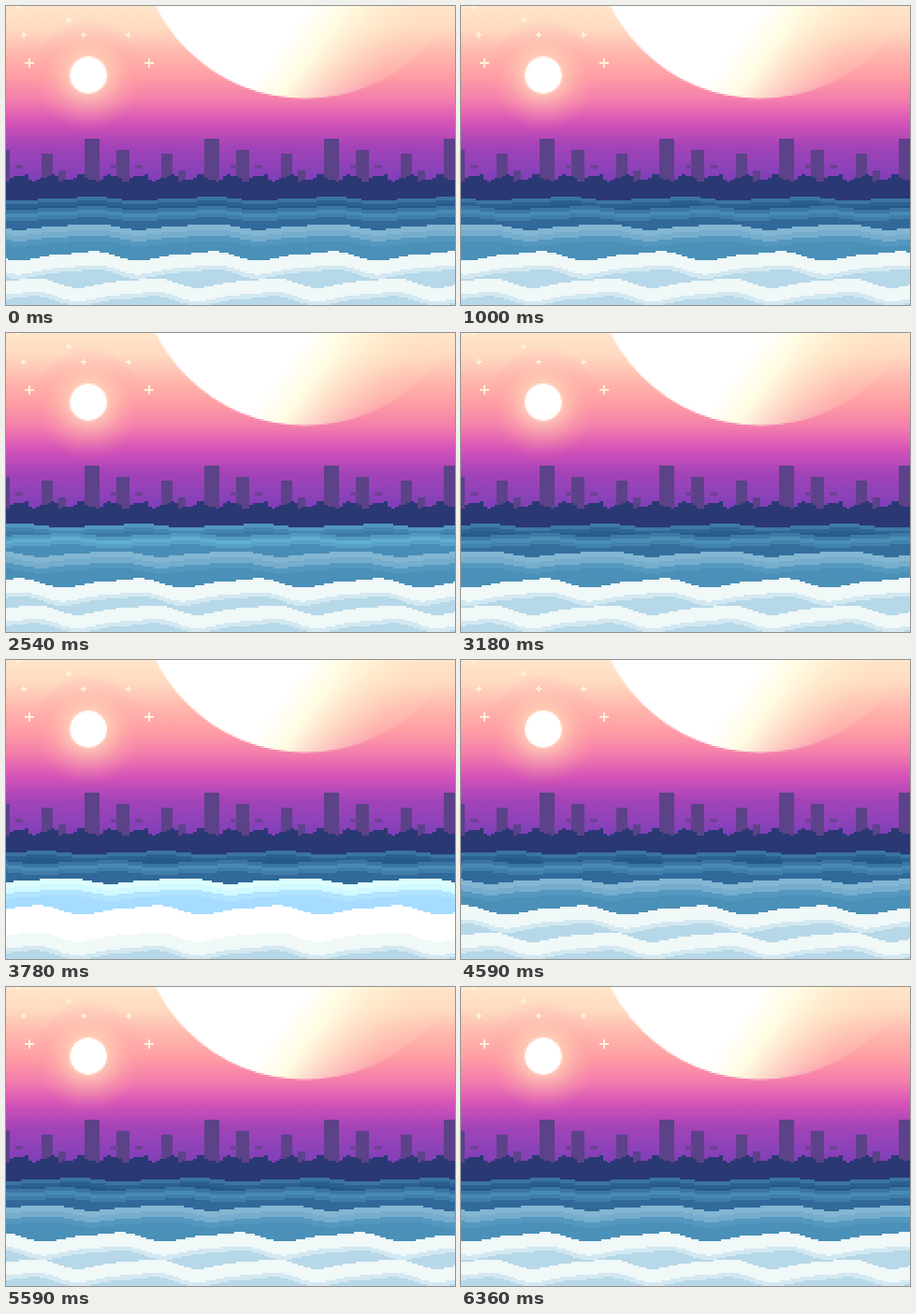
Animation, 480 px wide and 320 px high, one loop 6390 ms. Source, as an HTML page with a canvas:

```html
<!DOCTYPE html>
<html lang="en">
<head>
<meta charset="utf-8">
<title>City above the clouds</title>
<style>
  html, body { margin: 0; width: 100%; height: 100%; overflow: hidden; background: #2a3874; }
  canvas { display: block; width: 480px; height: 320px; image-rendering: pixelated; }
</style>
</head>
<body>
<canvas id="stage" width="240" height="160"></canvas>
<script>
const LOOP = 6390, STEPS = 192, W = 240, H = 160, TILE = 64;
const ctx = document.getElementById('stage').getContext('2d');
const backdrop = document.createElement('canvas');
backdrop.width = W;
backdrop.height = H;

// Cosine that fits a tile `times` times, with a peak at x = peak.
const ripple = (x, peak, times) => Math.cos((x - peak) * times * 2 * Math.PI / TILE);

// Spreads the colours evenly along a gradient.
function blend(gradient, ...colors) {
  colors.forEach((color, i) => gradient.addColorStop(i / (colors.length - 1), color));
  return gradient;
}

function drawBackdrop(c) {
  const rect = (color, x, y, w, h) => {
    c.fillStyle = color;
    c.fillRect(x, y, w, h);
  };
  const disc = (fill, x, y, r) => {
    c.fillStyle = fill;
    c.beginPath();
    c.arc(x, y, r, 0, 7);
    c.fill();
  };

  rect(blend(c.createLinearGradient(0, 0, 0, 100),
    '#ffe6ca', '#ffd9c1', '#ffb8ae', '#ff9ea4', '#f47eac',
    '#d453b8', '#a443b8', '#8a42b8', '#713db8'), 0, 0, W, H);

  disc(blend(c.createLinearGradient(107, 75, 164, 116),
    '#ffffff', '#fffbe2', 'rgba(255,238,208,.65)', 'rgba(255,226,198,.28)',
    'rgba(255,218,192,.14)'), 160, -40, 89.5);

  const sun = { x: 44, y: 37 };
  disc(blend(c.createRadialGradient(sun.x, sun.y, 9, sun.x, sun.y, 30),
    'rgba(255,216,186,.8)', 'rgba(255,196,176,.5)', 'rgba(255,170,168,.25)',
    'rgba(255,150,165,0)'), sun.x, sun.y, 30);
  disc('#fff', sun.x, sun.y, 10);

  for (const [x, y] of [[6, 0], [33, 7], [9, 15], [41, 15], [65, 15], [12, 30], [76, 30]]) {
    const arm = y > 20 ? 2 : 1;
    rect('#fff0d8', x - arm, y, arm * 2 + 1, 1);
    rect('#fff0d8', x, y - arm, 1, arm * 2 + 1);
  }

  // Towers: [x, width, top]
  for (let left = -TILE; left < W; left += TILE) {
    for (const [x, w, top] of [[19, 6, 79], [28, 4, 88], [42, 8, 71], [59, 7, 77]]) {
      rect('#5c4288', left + x, top, w, H);
    }
    for (const x of [5, 56]) rect('#704097', left + x, 85, 4, 2);
  }
  for (let x = 0; x < W; x += 2) {
    const roof = Math.round(92 - 1.7 * ripple(x, 7, 4) - .9 * ripple(x, 3, 9));
    rect('#2a3874', x, roof, 2, H);
  }
}

// One crest and one shoulder per tile, about 5 high.
const swell = x => 2.6 - 2.2 * ripple(x, 9, 1) - .7 * ripple(x, 20, 2);

// turns: tiles scrolled per loop; each colour is one band, `band` pixels deep.
// glow is added to the layer around the time `flash`.
const foam = ['#f0f8f8', '#f0f8f8', '#f0f8f8', '#d3e8f1', '#b6d8e9'];
const layers = [
  { y: 102, turns: 1, height: .4, band: 2, flash: 2700, glow: [28, 42, 34],
    colors: ['#3a74a4', '#2b6093', '#255789'] },
  { y: 107, turns: 2, height: .4, band: 2, flash: 2700, glow: [28, 42, 34],
    colors: ['#3a75a4', '#488bb3', '#3f7eaa', '#30699a'] },
  { y: 116.5, turns: 3, height: .6, band: 3, flash: 3780, glow: [92, 76, 72],
    colors: ['#82b6d2', '#76adcd', '#5498c0', '#4a90b8'] },
  { y: 131, turns: 6, height: 1, band: 2.4, flash: 3900, glow: [92, 92, 92], colors: foam },
  { y: 145.4, turns: 0, height: 1, band: 2.4, colors: foam }
];

function drawLayer({ y, turns, height, band, colors, flash, glow }, step, time) {
  const shift = turns && Math.floor(step * turns * TILE / STEPS) + TILE / 2;
  const fill = (color, depth) => {
    ctx.fillStyle = color;
    for (let x = 0; x < W; x++) {
      const top = Math.round(y + height * swell(x - shift) + depth);
      ctx.fillRect(x, top, 1, H - top);
    }
  };
  colors.forEach((color, i) => fill(color, i * band));

  if (!glow) return;
  const away = Math.min(1, Math.abs(time - flash) / 620);
  const strength = Math.cos(away * Math.PI / 2) ** 2;
  ctx.globalCompositeOperation = 'lighter';
  fill(`rgb(${glow.map(v => Math.round(v * strength))})`, 0);
  ctx.globalCompositeOperation = 'source-over';
}

function frame(now) {
  const time = now % LOOP;
  const step = Math.floor(time / LOOP * STEPS);
  ctx.drawImage(backdrop, 0, 0);
  for (const layer of layers) drawLayer(layer, step, time);
  requestAnimationFrame(() => frame(performance.now() - began));
}

drawBackdrop(backdrop.getContext('2d'));
const began = performance.now();
frame(0);
</script>
</body>
</html>
```
